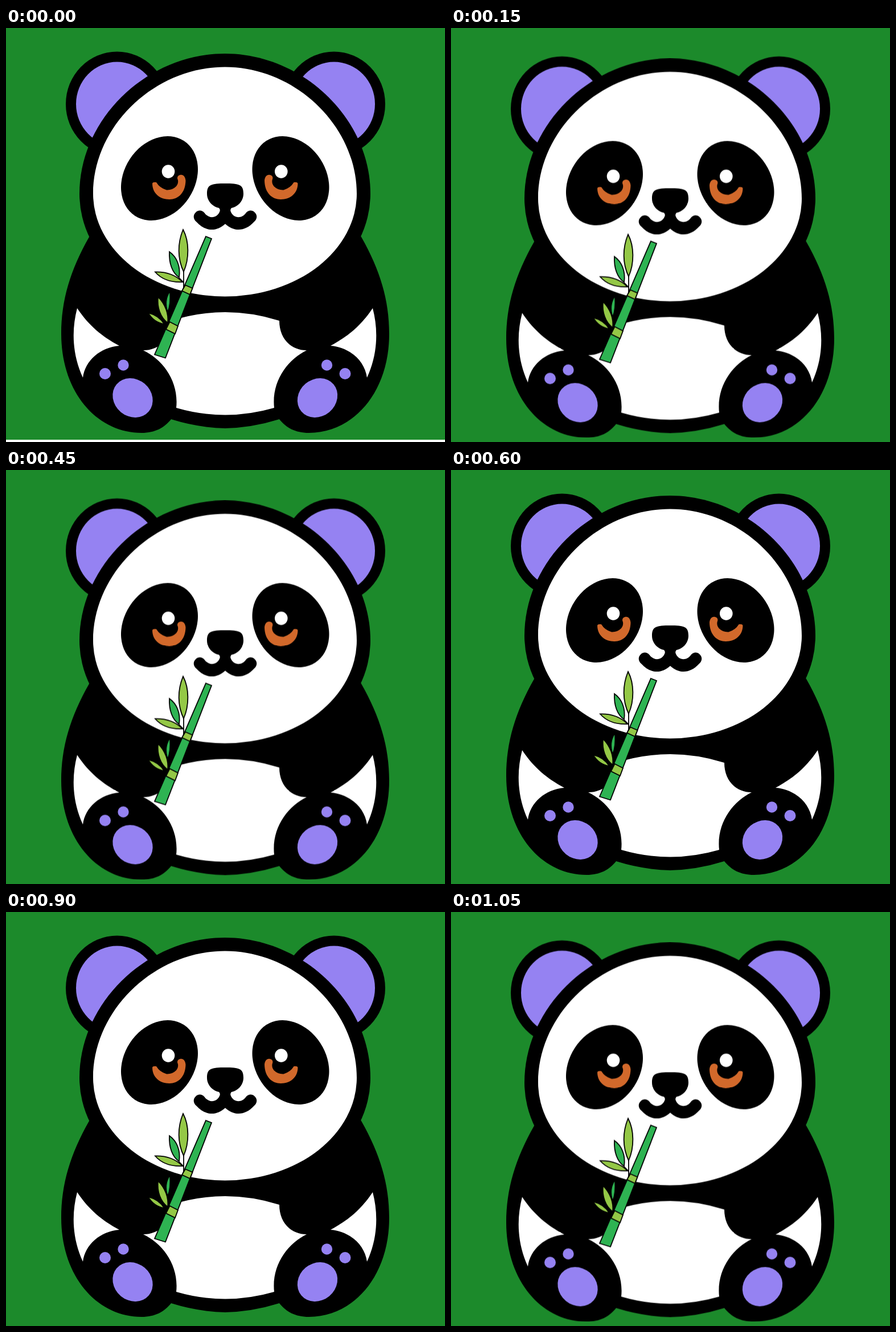
Write an HTML page that moves like this. It is 771 px wide and 727 px high and loops after 1200 ms.

```html
<!DOCTYPE html>
<html lang="en">
<head>
<meta charset="utf-8">
<title>Bouncing panda</title>
<style>
  html, body { margin: 0; width: 100%; height: 100%; overflow: hidden; background: #1c8a2b; }
  svg { display: block; width: 100%; height: 100%; }
  .white { fill: #fff; }
  .purple { fill: #9582f2; }
  .orange { fill: #d2692b; }
  .bamboo { stroke: #000; stroke-width: 1.8; }
  .dark { fill: #2eb352; }
  .light { fill: #94c846; }
  #panda { animation: bob 300ms step-end infinite; }
  #strip { animation: blink 1200ms step-end infinite; }
  @keyframes bob {
    0% { transform: translateY(0); }
    50%, 100% { transform: translateY(8.4px); }
  }
  @keyframes blink {
    0% { opacity: 1; }
    12.5%, 100% { opacity: 0; }
  }
</style>
</head>
<body>
<svg viewBox="0 0 771 727">
  <defs>
    <g id="ear">
      <ellipse cx="195" cy="133.5" rx="90" ry="92"/>
      <ellipse class="purple" cx="195" cy="133.5" rx="72" ry="74"/>
    </g>
    <!-- left half of the body, mirrored for the right -->
    <path id="side" d="M386 330H170L146 367C113 425 97 478 97 537C97 640 160 711 238 711C262 711 278 702 290 687Q338 702 386 703Z"/>
    <path id="flank" class="white" d="M125 492C115 530 116 573 135 614C139 584 165 561 199 558C165 540 143 519 125 492Z"/>
    <g id="paw" class="purple">
      <ellipse cx="222.5" cy="649.5" rx="37" ry="32.5" transform="rotate(40 222.5 649.5)"/>
      <circle cx="174" cy="607" r="10"/>
      <circle cx="206" cy="592" r="9.7"/>
    </g>
    <g id="eye">
      <ellipse cx="269.5" cy="264" rx="62.1" ry="78.6" transform="rotate(33.3 269.5 264)"/>
      <path class="orange" d="M257 273C257 291 271 301 287 301C302 301 315 290 315.500 268C315 261 311 257 306 258C301 259 300 263 302 267Q303 273 299 278Q292 285 282 284.500Q270 281 264 271Q258 270 257 273Z"/>
    </g>
    <path id="muzzle" d="M386 273C360 273 353 275 353 291C353 304 363 314 374 316Q377 319 375 323C371 333 357 337 348 324C344 320 338 319 333 324C328 329 329 336 334 340C350 358 370 358 385 344L386 343Z"/>
  </defs>

  <rect width="771" height="727" fill="#1c8a2b"/>
  <rect id="strip" class="white" y="723" width="771" height="4"/>

  <g id="panda">
    <use href="#ear"/>
    <use href="#ear" transform="matrix(-1 0 0 1 771 0)"/>
    <use href="#side"/>
    <use href="#side" transform="matrix(-1 0 0 1 770 0)"/>
    <path d="M129 291C129 159 248 45 384.500 45S640 159 640 291A255.5 210 0 0 1 129 291Z"/>
    <path class="white" d="M153 291C153 172 261 68.500 384.500 68.500S616 172 616 291A231.5 180.5 0 0 1 153 291Z"/>
    <path class="white" d="M290 514Q385 484 480 514C480 545 500 566 528 566C495 582 466 620 471 667Q385 692 299 667C304 620 275 582 241 566C270 566 290 545 290 514Z"/>

    <use href="#flank"/>
    <use href="#flank" transform="matrix(-1 0 0 1 769 0)"/>
    <use href="#paw"/>
    <use href="#paw" transform="matrix(-1 0 0 1 769.5 0)"/>
    <use href="#eye"/>
    <use href="#eye" transform="matrix(-1 0 0 1 769.5 0)"/>
    <ellipse class="white" cx="285" cy="252" rx="11.3" ry="11.7"/>
    <ellipse class="white" cx="483.3" cy="252" rx="11.3" ry="11.7"/>
    <use href="#muzzle"/>
    <use href="#muzzle" transform="matrix(-1 0 0 1 770 0)"/>

    <g class="bamboo">
      <path fill="none" d="M312 428V456M304 439L312 447"/>
      <path class="light" d="M311 354C301 378 301 405 312 428C322 405 322 375 311 354Z"/>
      <path class="dark" d="M287 393C286 413 292 430 304 438C307 419 300 402 287 393Z"/>
      <path class="light" d="M262 428.500C273 441 290 447 310 446C297 433 280 428 262 428.500Z"/>
      <path class="dark" d="M288 462C279 475 280 488 284 499C288 490 289 475 288 462Z"/>
      <path class="light" d="M267 472C265 491 271 508 284 518C286 502 280 485 267 472Z"/>
      <path class="light" d="M249.500 500C256 511 265 518 278 520C272 510 262 503 249.500 500Z"/>
      <path class="dark" d="M351 366L361 370L280 579.500L261 573.500Z"/>
      <path class="light" d="M315 451.500L327.500 457L323 468L309 461.500ZM287.500 516L302 523.500L297 537L281 529Z"/>
    </g>
  </g>
</svg>
</body>
</html>
```
